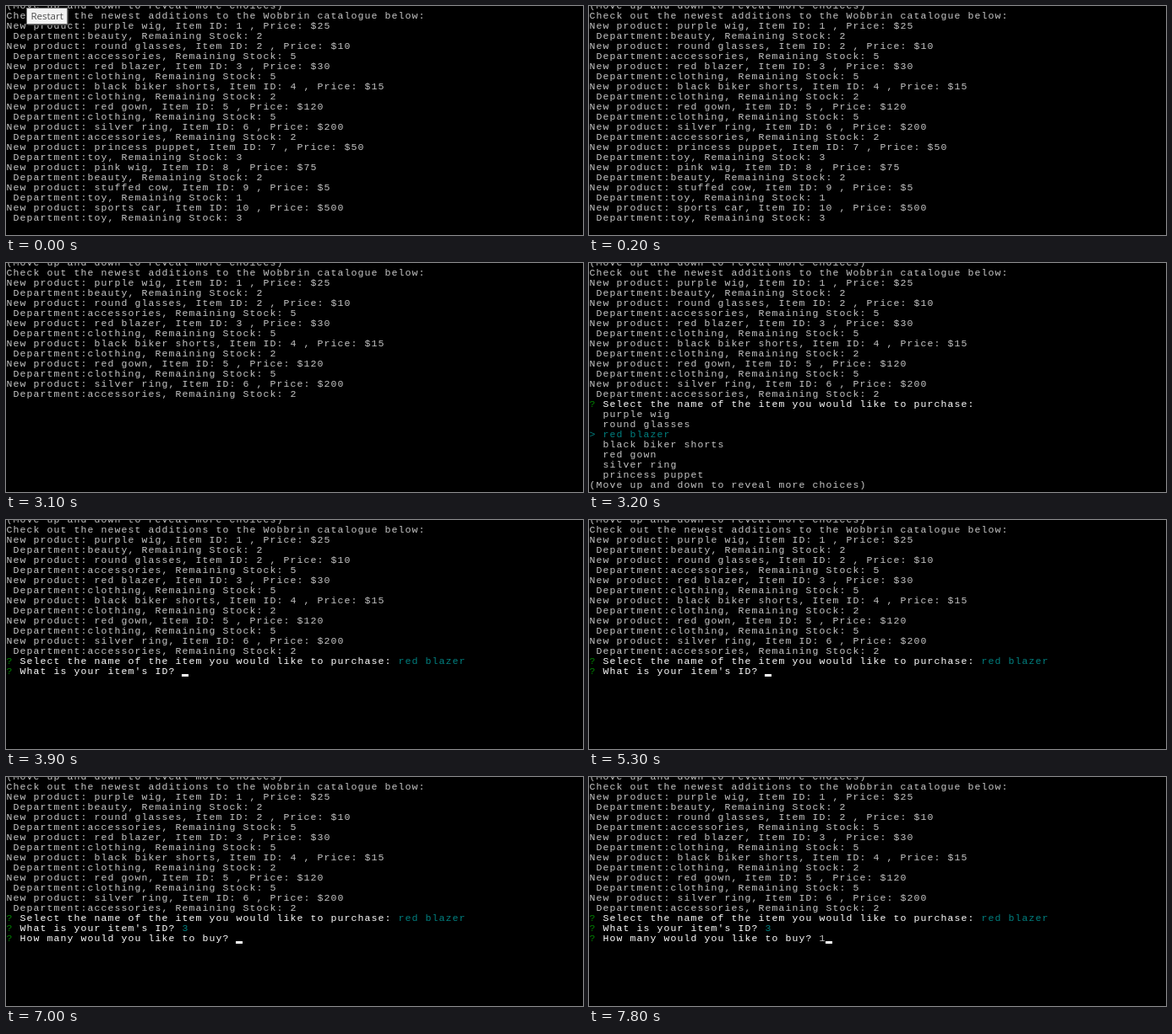
Animation, 683 px wide and 272 px high, one loop 8 s. Source, as an HTML page with a canvas:

```html
<!DOCTYPE html>
<html lang="en">
<head>
<meta charset="utf-8">
<title>Shop console</title>
<style>
  html, body { margin: 0; width: 100%; height: 100%; overflow: hidden; background: #000; }
  canvas { display: block; width: 683px; height: 272px; }
</style>
</head>
<body>
<canvas id="stage" width="683" height="272"></canvas>
<script>
const ctx = document.getElementById("stage").getContext("2d");
const LOOP = 8000, CELL_W = 8, CELL_H = 12, TOP = -6;
const GREY = "#c6c6c6", WHITE = "#fff", GREEN = "#008000", TEAL = "#008080";
const HINT = "(Move up and down to reveal more choices)";

const products = [
  ["purple wig", 25, "beauty", 2],
  ["round glasses", 10, "accessories", 5],
  ["red blazer", 30, "clothing", 5],
  ["black biker shorts", 15, "clothing", 2],
  ["red gown", 120, "clothing", 5],
  ["silver ring", 200, "accessories", 2],
  ["princess puppet", 50, "toy", 3],
  ["pink wig", 75, "beauty", 2],
  ["stuffed cow", 5, "toy", 1],
  ["sports car", 500, "toy", 3]
];

// Start time, view to show, and its options
const steps = [
  [0, { view: "catalogue", tip: 1 }],
  [100, { view: "catalogue", tip: 0.5 }],
  [200, { view: "catalogue" }],
  [2100, { view: "list", pick: 1 }],
  [3100, { view: "blank" }],
  [3200, { view: "list", pick: 2 }],
  [3900, { view: "id", typed: "", cursor: true }],
  [4400, { view: "id", typed: "" }],
  [4900, { view: "id", typed: "", cursor: true }],
  [5400, { view: "id", typed: "" }],
  [5900, { view: "id", typed: "", cursor: true }],
  [6100, { view: "id", typed: "3", cursor: true }],
  [6500, { view: "amount", typed: "" }],
  [7000, { view: "amount", typed: "", cursor: true }],
  [7500, { view: "amount", typed: "" }],
  [7800, { view: "amount", typed: "1", cursor: true }]
];

// Every character sits in its own console cell
function print(row, col, text, color = GREY) {
  ctx.fillStyle = color;
  [...text].forEach((ch, i) => {
    if (ch !== " ") ctx.fillText(ch, (col + i) * CELL_W + 0.5, TOP + row * CELL_H + 9);
  });
  return col + text.length;
}

function ask(row, question, answer = "", color = TEAL) {
  print(row, 0, "?", GREEN);
  const col = print(row, 2, question, WHITE) + 1;
  return print(row, col, answer, color);
}

function cursor(row, col) {
  ctx.fillStyle = WHITE;
  ctx.fillRect(col * CELL_W, TOP + row * CELL_H + 9, CELL_W, 3);
}

function catalogue(count) {
  print(0, 0, HINT);
  print(1, 0, "Check out the newest additions to the Wobbrin catalogue below:");
  products.slice(0, count).forEach(([name, price, dept, stock], i) => {
    print(2 + i * 2, 0, `New product: ${name}, Item ID: ${i + 1} , Price: $${price}`);
    print(3 + i * 2, 0, ` Department:${dept}, Remaining Stock: ${stock}`);
  });
}

function choices(pick) {
  products.slice(0, 7).forEach(([name], i) => {
    const on = i === pick;
    print(15 + i, 0, (on ? "> " : "  ") + name, on ? TEAL : GREY);
  });
  print(22, 0, HINT);
}

function tooltip(alpha) {
  ctx.save();
  ctx.globalAlpha = alpha;
  ctx.fillStyle = "#3a3a3a";
  ctx.fillRect(26, 4, 48, 19);
  ctx.fillStyle = "#767676";
  ctx.fillRect(24, 2, 49, 20);
  ctx.fillStyle = "#f3f3f3";
  ctx.fillRect(25, 3, 47, 18);
  ctx.fillStyle = "#4c4c4c";
  ctx.font = "11.5px 'Open Sans', 'Noto Sans', sans-serif";
  ctx.fillText("Restart", 29.5, 16);
  ctx.restore();
}

function draw(t) {
  const s = steps.filter(([at]) => at <= t).pop()[1];
  ctx.fillStyle = "#000";
  ctx.fillRect(0, 0, 683, 272);
  ctx.font = "11.5px 'Liberation Mono', 'DejaVu Sans Mono', monospace";

  catalogue(s.view === "catalogue" ? 10 : 6);
  if (s.tip) tooltip(s.tip);
  if (s.view === "catalogue" || s.view === "blank") return;

  const listing = s.view === "list";
  ask(14, "Select the name of the item you would like to purchase:", listing ? "" : "red blazer");
  if (listing) return choices(s.pick);

  const answered = s.view === "amount";
  let row = 15;
  let col = ask(row, "What is your item's ID?", answered ? "3" : s.typed, answered ? TEAL : GREY);
  if (answered) col = ask(++row, "How many would you like to buy?", s.typed, GREY);
  if (s.cursor) cursor(row, col);
}

const start = performance.now();
function tick() {
  draw((performance.now() - start) % LOOP);
  requestAnimationFrame(tick);
}
tick();
</script>
</body>
</html>
```
